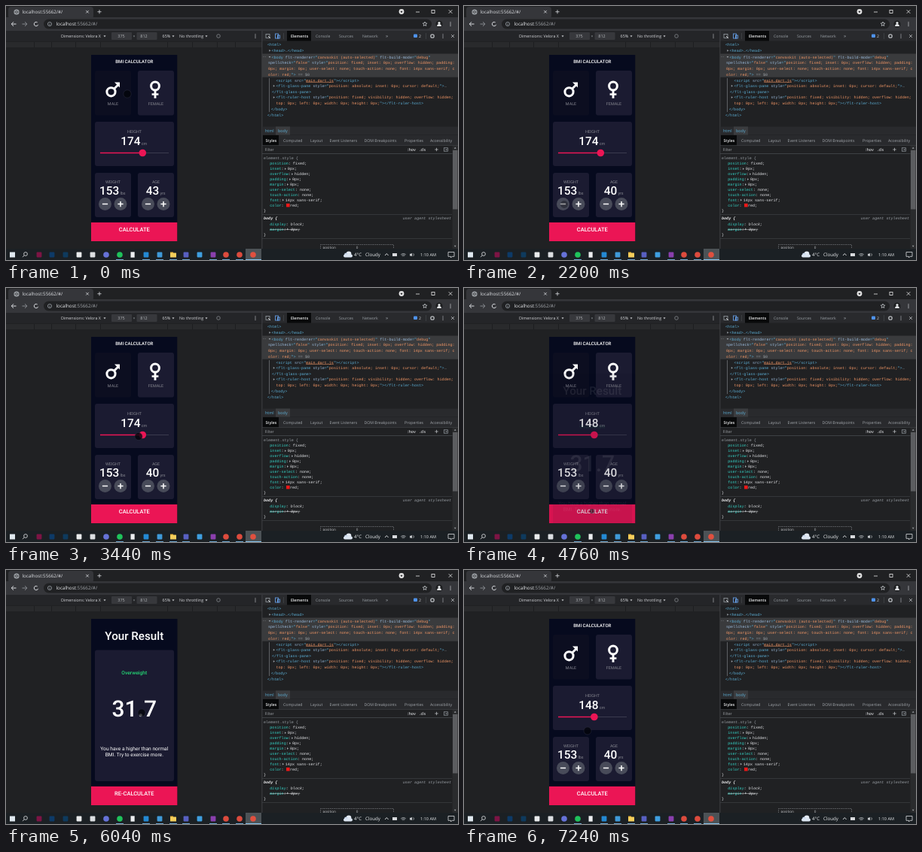
Animation, 600 px wide and 338 px high, one loop 7280 ms. Source, as an HTML page with a canvas:

```html
<!DOCTYPE html>
<html lang="en">
<head>
<meta charset="utf-8">
<title>BMI calculator</title>
<style>
html, body { margin: 0; width: 100%; height: 100%; overflow: hidden; background: #202123; }
canvas { display: block; width: 600px; height: 338px; }
</style>
</head>
<body>
<canvas id="stage" width="600" height="338"></canvas>
<script>
const LOOP = 7280;
const UI = '"Open Sans", "Noto Sans", sans-serif';
const APP = 'Roboto, sans-serif';
const MONO = '"Liberation Mono", "DejaVu Sans Mono", monospace';
const PINK = '#eb1555', CARD = '#1b1b31', DIM = '#0c0e20', PAGE = '#060a1e', MUTED = '#85868f';
const TONE = { t: '#5db0d7', n: '#9bbbdc', v: '#f29766', w: '#e4e6e9', g: '#9aa0a6', p: '#35d4c7' };

const main = document.getElementById('stage').getContext('2d');
const chrome = document.createElement('canvas');
chrome.width = 600;
chrome.height = 338;
let c = main;

// ---- drawing helpers
function box(x, y, w, h, fill, r = 0) {
  c.fillStyle = fill;
  c.beginPath();
  c.roundRect(x, y, w, h, r);
  c.fill();
}
function frameBox(x, y, w, h, col, width = 0.8) {
  c.strokeStyle = col;
  c.lineWidth = width;
  c.strokeRect(x, y, w, h);
}
function dot(x, y, r, fill, from = 0, to = Math.PI * 2) {
  c.fillStyle = fill;
  c.beginPath();
  c.arc(x, y, r, from, to);
  c.fill();
}
function ring(x, y, r, col, w = 0.8, from = 0, to = Math.PI * 2) {
  c.strokeStyle = col;
  c.lineWidth = w;
  c.beginPath();
  c.arc(x, y, r, from, to);
  c.stroke();
}
function line(col, w, ...pts) {
  c.strokeStyle = col;
  c.lineWidth = w;
  c.beginPath();
  for (let i = 0; i < pts.length; i += 2) c.lineTo(pts[i], pts[i + 1]);
  c.stroke();
}
function tri(x, y, s, col, right) {
  c.fillStyle = col;
  c.beginPath();
  if (right) { c.moveTo(x - s / 2, y - s); c.lineTo(x + s, y); c.lineTo(x - s / 2, y + s); }
  else { c.moveTo(x - s, y - s / 2); c.lineTo(x + s, y - s / 2); c.lineTo(x, y + s); }
  c.fill();
}
// y is the middle of the capitals; returns the advance width
function text(s, x, y, size, col, font = UI, style = '', align = 'left') {
  c.save();
  c.translate(x, y + size * 0.36);
  c.scale(0.5, 0.5);
  c.font = `${style} ${size * 2}px ${font}`;
  c.textAlign = align;
  c.textRendering = 'geometricPrecision';
  c.fillStyle = col;
  c.fillText(s, 0, 0);
  const w = c.measureText(s).width / 2;
  c.restore();
  return w;
}
const label = (s, x, y, size, col, weight = '') => text(s, x, y, size, col, APP, weight, 'center');
function code(x, y, ...runs) {
  for (let i = 0; i < runs.length; i += 2) x += text(runs[i + 1], x, y, 5.1, TONE[runs[i]], MONO);
  return x;
}
function dots(x, y, col) {
  for (const d of [-2.2, 0, 2.2]) dot(x, y + d, 0.65, col);
}
function cross(x, y, s, col, w = 0.8) {
  line(col, w, x - s, y - s, x + s, y + s);
  line(col, w, x - s, y + s, x + s, y - s);
}
function plus(x, y, s, col, w = 0.8) {
  line(col, w, x - s, y, x + s, y);
  line(col, w, x, y - s, x, y + s);
}

// ---- browser window
function drawBrowser() {
  box(0, 0, 600, 338, '#202123');
  box(3, 1, 113, 16, '#35363a', 4);
  box(0, 15, 600, 18, '#35363a');
  dot(14, 8, 3.6, '#9da1a6');
  ring(14, 8, 1.6, '#4a4c50', 0.8);
  line('#4a4c50', 0.6, 10.5, 8, 17.5, 8);
  text('localhost:55662/#/', 21.5, 7.7, 6.2, '#dfe1e5');
  cross(108, 7.7, 1.8, '#dadce0');
  plus(124, 7.7, 2.6, '#dadce0');
  dot(525, 7.5, 3.4, '#e4e4e4');
  tri(525, 7.5, 1.7, '#26272a');
  line('#e8e8e8', 0.8, 544, 8, 549, 8);
  frameBox(565, 5.5, 4, 4, '#e8e8e8');
  cross(590, 7.5, 2.3, '#e8e8e8');

  line('#dadce0', 1, 13.5, 24, 7.5, 24);
  line('#dadce0', 1, 10, 21.2, 7.2, 24, 10, 26.8);
  line('#85888d', 1, 21.5, 24, 28, 24);
  line('#85888d', 1, 25, 21.2, 28, 24, 25, 26.8);
  ring(40, 24, 2.7, '#dadce0', 1, 0.3, 5.4);
  box(50, 17.5, 515, 13, '#202123', 6.5);
  ring(58, 24, 2.6, '#9aa0a6', 0.8);
  line('#9aa0a6', 0.8, 58, 23.4, 58, 25.6);
  const host = text('localhost', 66.5, 24, 6.3, '#e8eaed');
  text(':55662/#/', 66.5 + host, 24, 6.3, '#a2a6ab');
  c.strokeStyle = '#c5c8cc';
  c.lineWidth = 0.8;
  c.beginPath();
  for (let i = 0; i < 10; i++) {
    const a = i * Math.PI / 5 - Math.PI / 2, r = i % 2 ? 1.4 : 3;
    c.lineTo(556 + r * Math.cos(a), 24 + r * Math.sin(a));
  }
  c.closePath();
  c.stroke();
  dot(575, 24, 4.6, '#1d1e20');
  dot(575, 22.5, 1.6, '#e4e6e8');
  dot(575, 27, 2.9, '#e4e6e8', Math.PI, 0);
  dots(590, 24, '#dadce0');
}

function drawDeviceBar() {
  box(0, 33, 340, 14, '#242528');
  text('Dimensions: Velora X', 73, 40, 5.4, '#d5d7da');
  tri(131, 40, 1.5, '#c0c2c6');
  box(140, 35, 27, 10, '#37383c', 1);
  text('375', 153, 40, 5.5, '#b4b7bb', UI, '', 'center');
  text('×', 170, 40, 5.2, '#9aa0a6', UI, '', 'center');
  box(173.5, 35, 27, 10, '#37383c', 1);
  text('812', 183, 40, 5.5, '#b4b7bb', UI, '', 'center');
  text('65%', 207.5, 40, 5.5, '#d5d7da');
  tri(222, 40, 1.5, '#c0c2c6');
  text('No throttling', 230, 40, 5.4, '#d5d7da');
  tri(266, 40, 1.5, '#c0c2c6');
  ring(282, 40, 2.3, '#85888d', 0.8);
  dots(331, 40, '#c0c2c6');
  box(0, 48, 340, 7, '#292a2c');
  for (const x of [37, 60, 92, 125, 214, 247, 280, 304]) box(x, 48, 1, 7, '#1d1e20');
}

function drawElements() {
  box(340, 33, 260, 290, '#202123');
  box(340, 33, 260, 13.5, '#292a2d');
  box(339.5, 33, 0.8, 290, '#47494d');
  frameBox(345, 37.5, 5, 5, '#9aa0a6');
  line('#d0d2d5', 1, 348, 40, 351, 43);
  frameBox(357.5, 37, 4, 6, '#69a7f5');
  frameBox(360.5, 39, 3, 4, '#69a7f5');
  box(368, 36, 0.6, 8, '#4a4c50');
  box(373, 33, 32, 13.5, '#08090a');
  text('Elements', 378, 40, 5.2, '#f2f3f4', UI, '600');
  text('Console', 411, 40, 5.2, '#9aa0a6');
  text('Sources', 442, 40, 5.2, '#9aa0a6');
  text('Network', 473, 40, 5.2, '#9aa0a6');
  text('»', 504, 39.5, 6.5, '#9aa0a6');
  box(541, 37.5, 5, 4.5, '#4f93ee', 1);
  text('2', 548, 40, 5.2, '#d0d2d5');
  box(557, 36, 0.6, 8, '#4a4c50');
  ring(566, 40, 2.2, '#b5b8bc', 1.3);
  dots(580, 40, '#b5b8bc');
  cross(593, 40, 2, '#b5b8bc');

  box(340, 63.5, 260, 31.2, '#3a3b3d');
  box(349, 96, 0.9, 45, '#66686b');
  code(347, 51, 't', '<html>');
  tri(350, 59.3, 1.4, '#9aa0a6', true);
  code(352.5, 59.3, 't', '<head>', 'g', '…', 't', '</head>');
  text('…', 341, 66, 5, '#9aa0a6');
  tri(350, 67.7, 1.4, '#9aa0a6');
  code(352.5, 67.7, 't', '<body ', 'n', 'flt-renderer', 't', '="', 'v', 'canvaskit (auto-selected)',
    't', '" ', 'n', 'flt-build-mode', 't', '="', 'v', 'debug', 't', '"');
  code(348, 75.3, 'n', 'spellcheck', 't', '="', 'v', 'false', 't', '" ', 'n', 'style', 't', '="',
    'v', 'position: fixed; inset: 0px; overflow: hidden; padding:');
  code(348, 83, 'v', '0px; margin: 0px; user-select: none; touch-action: none; font: 14px sans-serif; c');
  code(348, 90.8, 'v', 'olor: red;', 't', '">', 'g', ' == $0');
  let x = code(358.5, 98.7, 't', '<script ', 'n', 'src', 't', '="');
  const end = code(x, 98.7, 'v', 'main.dart.js');
  box(x, 101, end - x, 0.5, TONE.v);
  code(end, 98.7, 't', '"><\/script>');
  tri(355.5, 106.3, 1.4, '#9aa0a6', true);
  code(358.5, 106.3, 't', '<flt-glass-pane ', 'n', 'style', 't', '="',
    'v', 'position: absolute; inset: 0px; cursor: default;', 't', '">', 'g', '…');
  code(353, 114, 't', '</flt-glass-pane>');
  tri(355.5, 121.6, 1.4, '#9aa0a6', true);
  code(358.5, 121.6, 't', '<flt-ruler-host ', 'n', 'style', 't', '="',
    'v', 'position: fixed; visibility: hidden; overflow: hidden;');
  code(358.5, 129.3, 'v', 'top: 0px; left: 0px; width: 0px; height: 0px;', 't', '"></flt-ruler-host>');
  code(352, 137.6, 't', '</body>');
  code(347, 145.6, 't', '</html>');

  box(340, 160.5, 260, 11, '#292a2d');
  text('html', 344, 166, 5.4, '#5db0d7');
  box(358, 160.5, 19, 11, '#3b3c3f');
  text('body', 361, 166, 5.4, '#5db0d7');
}

function drawStyles() {
  box(340, 172, 260, 13.5, '#292a2d');
  const tabs = { Computed: 368, Layout: 404, 'Event Listeners': 429.5, 'DOM Breakpoints': 475.5, Properties: 529, Accessibility: 563 };
  box(341, 172, 21, 13.5, '#08090a');
  text('Styles', 344.5, 178.7, 5.2, '#f2f3f4', UI, '600');
  for (const name in tabs) text(name, tabs[name], 178.7, 5.2, '#a3a8ad');
  box(340, 185.5, 260, 0.6, '#494c50');
  text('Filter', 343.5, 191, 5.2, '#a0a4a9');
  text(':hov', 533, 191, 5.3, '#d0d2d5', UI, '600');
  text('.cls', 549, 191, 5.3, '#d0d2d5', UI, '600');
  plus(571.5, 191, 2.2, '#b5b8bc');
  frameBox(581.5, 188.8, 5, 4.4, '#9aa0a6', 0.7);
  tri(584.5, 191, 1.2, '#9aa0a6');
  box(340, 196.3, 260, 0.6, '#494c50');
  box(592.5, 186, 7.5, 137, '#2a2b2d');
  box(593, 192, 6.5, 78.5, '#5c5d60');
  tri(596.2, 189, -1.3, '#a3a6aa');
  tri(596.2, 319.5, 1.3, '#a3a6aa');

  code(342, 202, 'g', 'element.style {');
  const rules = [['position', 'fixed'], ['inset', '0px', 1], ['overflow', 'hidden', 1], ['padding', '0px', 1],
    ['margin', '0px', 1], ['user-select', 'none'], ['touch-action', 'none'], ['font', '14px sans-serif', 1], ['color', 'red', 2]];
  rules.forEach(([name, value, mark], i) => {
    const y = 209.5 + i * 6.92;
    let x = code(350.3, y, 'p', name, 'w', ':');
    if (mark === 1) { tri(x + 2, y + 0.3, 1.4, '#9aa0a6', true); x += 2.2; }
    if (mark === 2) { box(x + 3.4, y - 2, 4.6, 4.6, '#f01818'); x += 5.3; }
    code(x + 3, y, 'w', value + ';');
  });
  code(342, 272, 'w', '}');
  box(340, 277, 252, 0.6, '#494c50');
  text('body {', 342, 282.6, 5.1, '#f0f1f2', MONO, 'italic bold');
  text('user agent stylesheet', 591, 282.3, 5.1, '#9aa0a6', MONO, 'italic', 'right');
  let w = text('display', 350.3, 289.7, 5.1, TONE.p, MONO, 'italic');
  text(': block;', 350.3 + w, 289.7, 5.1, TONE.w, MONO, 'italic');
  w = text('margin', 350.3, 296.7, 5.1, TONE.p, MONO, 'italic');
  text(':', 350.3 + w, 296.7, 5.1, TONE.w, MONO, 'italic');
  tri(373.7, 297, 1.4, '#9aa0a6', true);
  text('0px;', 378, 296.7, 5.1, TONE.w, MONO, 'italic');
  box(350.3, 297, 40, 0.6, '#d5d7da');
  code(342, 304, 'w', '}');
  box(340, 309.5, 252, 0.6, '#494c50');
  c.setLineDash([1.5, 1]);
  frameBox(417.5, 317.5, 97, 12, '#7d8085', 0.7);
  c.setLineDash([]);
  text('position', 420.5, 321.7, 4.6, '#c3c6ca');
  text('0', 466, 321.7, 4.6, '#c3c6ca', UI, '', 'center');
}

function drawTaskbar() {
  box(0, 323, 600, 15, '#1b2024');
  box(318, 323, 21, 15, '#4c5256');
  box(5, 327.5, 7, 7, '#dfe8ef');
  ring(26, 330, 2.4, '#e4e6e8', 0.8);
  line('#e4e6e8', 0.8, 24.2, 331.8, 22, 334.2);
  const tiles = { 44: '#7c1444', 61: '#0d3a68', 79: '#0e3a5e', 97: '#e9ebec', 115: '#dcdfe2', 186: '#2489d3', 204: '#3f9ad8', 239: '#5860c2', 257: '#3f9fe0', 275: '#8a3fae' };
  for (const x in tiles) box(x - 3.4, 327.6, 6.8, 6.8, tiles[x], 0.8);
  const discs = { 133: '#6672d8', 151: '#1fc35b', 292: '#dc4b3d', 310: '#dc4b3d', 328: '#e0503f' };
  for (const x in discs) dot(+x, 331, 3.8, discs[x]);
  box(165.5, 327.3, 5.2, 7.4, '#eceef0');
  box(218, 327.5, 4, 2, '#e0a92e');
  box(218, 328.5, 8, 6, '#f5ce5b', 0.5);
  for (const x of [151, 186, 204, 222, 239, 275, 292, 310]) box(x - 5, 337, 10, 1, '#6fa6cf');
  box(318, 337, 21, 1, '#86c3ee');
  dot(455, 330, 3.4, '#e4ebf4');
  dot(451.5, 331, 2.4, '#c8d8ec');
  box(448, 330.5, 12, 4, '#dce6f2', 2);
  text('4°C', 462, 331, 6.2, '#eceef0');
  text('Cloudy', 477, 331, 6.2, '#eceef0');
  line('#e4e6e8', 0.9, 503, 332, 505.3, 329.5, 507.6, 332);
  box(513, 329, 6, 4, '#d8dadd');
  for (const r of [1.5, 3, 4.5]) ring(527.5, 334, r, '#b4b8bb', 0.8, -2.4, -0.75);
  box(536, 329.8, 2, 2.6, '#c4c7ca');
  tri(538, 331, -2.2, '#c4c7ca', true);
  ring(539, 331, 2.4, '#c4c7ca', 0.7, -0.8, 0.8);
  text('1:10 AM', 560.5, 331, 5.5, '#eceef0', UI, '', 'center');
  line('#d8dadd', 0.8, 587, 327.5, 595, 327.5, 595, 333.3, 592, 333.3, 590.5, 335, 590.5, 333.3, 587, 333.3, 587, 327.5);
}

// ---- motion
function bezier(x1, y1, x2, y2) {
  const at = (a, b, u) => 3 * a * u * (1 - u) ** 2 + 3 * b * u * u * (1 - u) + u ** 3;
  return x => {
    let lo = 0, hi = 1;
    for (let i = 0; i < 20; i++) {
      const mid = (lo + hi) / 2;
      if (at(x1, x2, mid) < x) lo = mid; else hi = mid;
    }
    return at(y1, y2, lo);
  };
}
const slideEase = bezier(0.4, 0, 0.2, 1), fadeEase = bezier(0.42, 0, 1, 1);
const ramp = (t, from, to) => Math.min(1, Math.max(0, (t - from) / (to - from)));
const smooth = u => u * u * (3 - 2 * u);

// time, x, y, opacity, radius
const POINTER = [
  [0, 161, 117, 0.8, 5.2], [100, 161, 117, 0.8, 5.2], [950, 188.5, 264, 0.35, 5],
  [1780, 188.5, 264, 0.35, 5], [2150, 133, 264, 0.35, 5], [2450, 133, 264, 0.35, 5],
  [3440, 176, 197.5, 0.8, 5], [3600, 181, 196, 0.7, 4.8], [4150, 172.9, 196, 0.7, 4.8],
  [4500, 170, 297, 0.5, 3], [5050, 170, 297, 0.5, 3], [5850, 180, 190, 0.75, 5],
  [6100, 180, 190, 0.75, 5], [6480, 172, 297, 0.5, 3], [6750, 172, 297, 0.5, 3],
  [7200, 164, 214, 0.8, 5], [7280, 164, 214, 0.8, 5]
];
function drawPointer(t) {
  const i = Math.max(1, POINTER.findIndex(k => k[0] > t));
  const a = POINTER[i - 1], b = POINTER[i], u = smooth(ramp(t, a[0], b[0]));
  const [, x, y, alpha, r] = a.map((v, n) => v + (b[n] - v) * u);
  dot(x, y, r, `rgba(3,4,10,${alpha})`);
  ring(x, y, r, `rgba(60,64,84,${alpha * 0.6})`, 0.7);
}

// ---- phone
function reading(value, unit, left, y) {
  const w = text(String(value), left, y, 15.4, '#fff', APP, '500');
  text(unit, left + w + 1.2, y + 3.7, 5.4, MUTED, APP);
}
function button(x, isPlus) {
  dot(x, 263.6, 8.5, '#484b59');
  if (isPlus) plus(x, 263.6, 3.6, '#fff', 1.5);
  else line('#fff', 1.5, x - 3.6, 263.6, x + 3.6, 263.6);
}
function drawForm(t) {
  box(113, 65, 114.5, 248, PAGE);
  label('BMI CALCULATOR', 170.3, 73.5, 6.1, '#fff', '500');
  box(118, 86, 48, 59.5, DIM, 3);
  box(175, 86, 48, 59.5, CARD, 3);
  box(118, 154, 105, 59, CARD, 3);
  box(118, 222, 48, 59, CARD, 3);
  box(175, 222, 48, 59, CARD, 3);

  ring(139.5, 114.3, 5.6, '#fff', 3);
  line('#fff', 2.8, 143.5, 110.3, 149, 104.8);
  c.fillStyle = '#fff';
  c.beginPath();
  c.moveTo(144, 101.5); c.lineTo(151, 101.5); c.lineTo(151, 108.5);
  c.fill();
  ring(198, 106.5, 5.4, '#fff', 3);
  line('#fff', 2.9, 198, 112.5, 198, 122.7);
  line('#fff', 2.7, 193.6, 117.5, 202.4, 117.5);
  label('MALE', 142, 130.5, 5.4, MUTED);
  label('FEMALE', 199, 130.5, 5.4, MUTED);

  const height = Math.round(174 - 26 * smooth(ramp(t, 3600, 4150)));
  const knob = 125 + height * 0.3235;
  label('HEIGHT', 170.5, 167.3, 5.4, MUTED);
  reading(height, 'cm', 152.2, 179.4);
  line('#3b3b4e', 1, knob, 195.5, 216, 195.5);
  line(PINK, 1.5, 125, 195.5, knob, 195.5);
  dot(knob, 195.5, 4.8, PINK);

  const age = 43 - [1300, 1480, 1660].filter(s => t >= s).length;
  label('WEIGHT', 142, 233.8, 5.4, MUTED);
  reading(153, 'lbs', 124, 245.5);
  label('AGE', 199, 233.8, 5.4, MUTED);
  reading(age, 'yrs', 185.7, 245.5);
  button(131.5, false);
  button(152, true);
  button(188.5, false);
  button(209, true);
  box(113, 288, 114.5, 25, PINK);
  label('CALCULATE', 170.3, 297.5, 7.5, '#fff', '500');
}
function drawResult(p) {
  c.save();
  c.globalAlpha = fadeEase(p);
  c.translate(0, 62 * (1 - slideEase(p)));
  box(113, 65, 114.5, 248, PAGE);
  label('Your Result', 170.3, 87.8, 15.2, '#fff', '500');
  box(118, 106.5, 105, 174.5, CARD, 3);
  label('Overweight', 170.3, 136.2, 6.7, '#24d876', '500');
  label('31.7', 170.3, 184.4, 30, '#fff', '500');
  label('You have a higher than normal', 170.3, 237.5, 6.7, '#fff');
  label('BMI. Try to exercise more.', 170.3, 245.5, 6.7, '#fff');
  box(113, 288, 114.5, 25, PINK);
  label('RE-CALCULATE', 170.3, 297.5, 7.5, '#fff', '500');
  c.restore();
}

c = chrome.getContext('2d');
drawBrowser();
drawDeviceBar();
drawElements();
drawStyles();
drawTaskbar();
c = main;

let start;
function frame(now) {
  start ??= now;
  const t = (now - start) % LOOP;
  c.drawImage(chrome, 0, 0);
  c.save();
  c.beginPath();
  c.rect(113, 65, 114.5, 248);
  c.clip();
  drawForm(t);
  const shown = ramp(t, 4688, 4988) - ramp(t, 6600, 6900);
  if (shown > 0) drawResult(shown);
  drawPointer(t);
  c.restore();
  requestAnimationFrame(frame);
}
requestAnimationFrame(frame);
</script>
</body>
</html>
```
